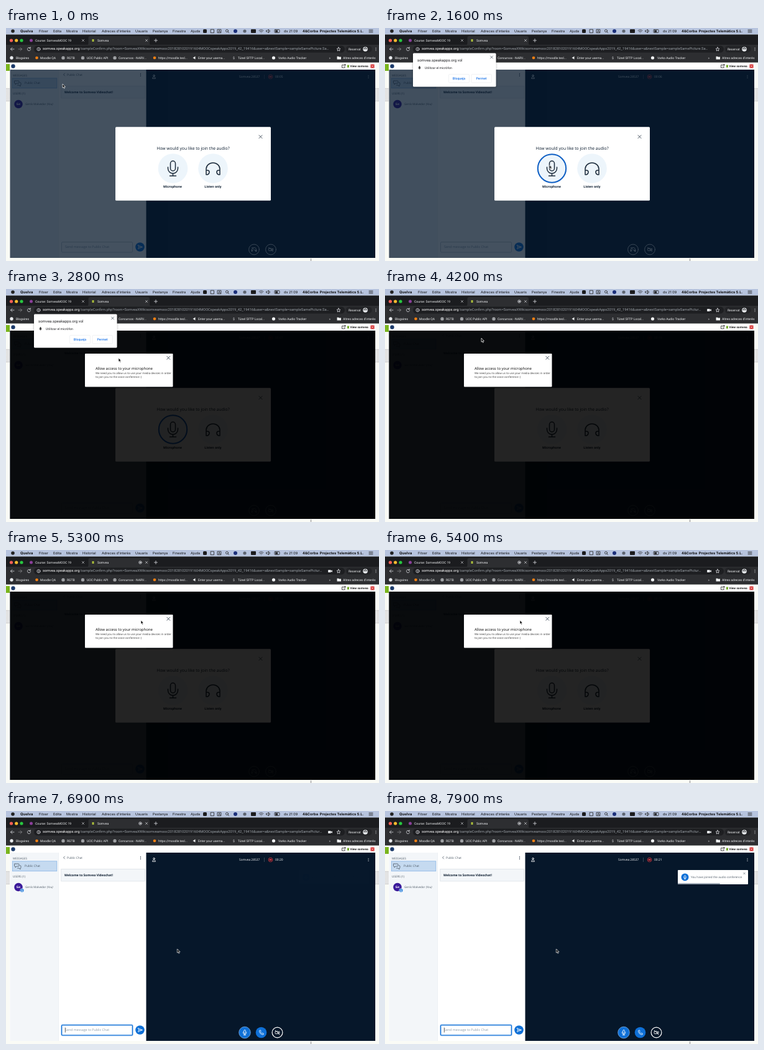
Recreate the animation shown at these times as an HTML page. Size 600 by 375 pixels, loop 8000 ms.

```html
<!DOCTYPE html>
<html lang="ca">
<head>
<meta charset="utf-8">
<title>Audio check</title>
<style>
html, body { margin: 0; width: 100%; height: 100%; overflow: hidden; background: #fff; }
svg { position: absolute; left: 0; top: 0; width: 600px; height: 375px; }
text { white-space: pre; text-rendering: geometricPrecision; }
.sys { font: 5.6px Inter, sans-serif; fill: #111; }
.ui { font: 5.05px Roboto, sans-serif; fill: #f1f3f4; }
.app { font: 4.8px "Open Sans", sans-serif; fill: #4e5a66; }
.b { font-weight: 700; }
.mid { text-anchor: middle; }
.ink { fill: #06172a; }
.line { fill: none; stroke: #4e5a66; stroke-width: .8; stroke-linecap: round; stroke-linejoin: round; }
.white { stroke: #fff; }
.light { stroke: #dcdee2; }
.navy { stroke: #1b2a3a; stroke-width: 1.5; }
.head { font-size: 6.75px; }
.url {
  position: absolute; left: 59px; top: 29px; width: 465px; height: 10px;
  font: 5.75px/10px Roboto, sans-serif; color: #9aa0a6; white-space: nowrap;
  overflow: hidden; text-overflow: ellipsis; text-rendering: geometricPrecision;
  animation: url 8s step-end infinite;
}
.url b { font-weight: 400; color: #fff; }

/* 1% = 80 ms */
.cut { animation: 8s step-end infinite; }
@keyframes url { 0% { width: 465px } 47.5% { width: 452px } }
@keyframes capture { 0% { opacity: 0 } 47.5% { opacity: 1 } }
@keyframes prompt { 0% { opacity: 0 } 16.25% { opacity: 1 } 47.5% { opacity: 0 } }
@keyframes ring { 0% { opacity: 0 } 14.375% { opacity: 1 } 47.5% { opacity: 0 } }
@keyframes ask { 0% { opacity: 1 } 68.75% { opacity: 0 } }
@keyframes echo { 0% { opacity: 0 } 68.75% { opacity: 1 } 82.5% { opacity: 0 } }
@keyframes before { 0% { opacity: 1 } 82.5% { opacity: 0 } }
@keyframes after { 0% { opacity: 0 } 82.5% { opacity: 1 } }
@keyframes caret { 0% { opacity: 0 } 83.75% { opacity: 1 } 90% { opacity: 0 } 96.25% { opacity: 1 } }
@keyframes t05 { 0% { opacity: 1 } 7.5% { opacity: 0 } }
@keyframes t06 { 0% { opacity: 0 } 7.5% { opacity: 1 } 20.625% { opacity: 0 } }
@keyframes t07 { 0% { opacity: 0 } 20.625% { opacity: 1 } 47.5% { opacity: 0 } }
@keyframes t19 { 0% { opacity: 0 } 47.5% { opacity: 1 } 82.5% { opacity: 0 } }
@keyframes t20 { 0% { opacity: 0 } 82.5% { opacity: 1 } 94.375% { opacity: 0 } }
@keyframes t21 { 0% { opacity: 0 } 94.375% { opacity: 1 } }
.allow { animation: allow 8s linear infinite; }
@keyframes allow { 0%, 20% { opacity: 0 } 26.25%, 68.125% { opacity: 1 } 68.75%, 100% { opacity: 0 } }
.toast { animation: toast 8s ease-out infinite; }
@keyframes toast { 0%, 86.25% { opacity: 0 } 88.75%, 100% { opacity: 1 } }
.bar { transform-origin: 471px 0; animation: bar 8s linear infinite; }
@keyframes bar { 0%, 86.25% { transform: none } 100% { transform: scaleX(.56) } }
.cursor { animation: move 8s ease-in-out infinite; }
@keyframes move {
  0%, 1.25% { transform: translate(91px, 90px) }
  12.5%, 28.75% { transform: translate(264.5px, 220.5px) }
  35% { transform: translate(181px, 111px) }
  39.375%, 58.75% { transform: translate(155px, 79px) }
  66.25%, 67.5% { transform: translate(217px, 113px) }
  75%, 100% { transform: translate(275.5px, 222px) }
}
</style>
</head>
<body>
<svg viewBox="0 0 600 375">
  <defs>
    <pattern id="hatch" width="2" height="2" patternUnits="userSpaceOnUse">
      <rect width="2" height="2" fill="#eee"/><path d="M0 2L2 0" stroke="#c4c4c4" stroke-width=".5"/>
    </pattern>
    <filter id="shade" x="-10%" y="-10%" width="120%" height="130%">
      <feDropShadow dx="0" dy="1" stdDeviation="1.5" flood-opacity=".4"/>
    </filter>
    <path id="x" d="M-2-2L2 2M2-2L-2 2"/>
    <path id="slash" d="M-3.5-3.5L3.5 3.5"/>
    <g id="globe"><circle r="2.6" fill="#dfe1e5"/><path d="M-2.6 0H2.6M0-2.6C-1.8-1-1.8 1 0 2.6C1.8 1 1.8-1 0-2.6" fill="none" stroke="#2d2e31" stroke-width=".5"/></g>
    <g id="dots"><circle cy="-2" r=".6"/><circle r=".6"/><circle cy="2" r=".6"/></g>
    <g id="mic"><rect x="-4" y="-12" width="8" height="16" rx="4"/><path d="M-8-2V0A8 8 0 0 0 8 0V-2M0 8V12M-5 12H5"/></g>
    <path id="phones" d="M-11 8V0A11 10 0 0 1 11 0V8M-11 2H-9Q-6 2-6 5T-9 9H-11ZM11 2H9Q6 2 6 5T9 9H11Z"/>
    <path id="thumb" d="M-8 0H-3Q1-3 0-8Q0-10 2-10Q5-9 4-2H7Q9-1 8 1Q9 3 7 4Q8 6 6 7Q6 9 4 9H-2Q-4 8-8 8Z"/>
    <g id="person"><circle cy="-1.3" r="1.3"/><path d="M-2.4 3Q-2.4.7 0 .7T2.4 3Z"/></g>
    <g id="cam"><rect x="-3.4" y="-2" width="4.6" height="4" rx=".6"/><path d="M1.2-.4L3.4-1.7V1.7L1.2.4"/></g>
  </defs>

  <!-- page behind the dialog -->
  <rect width="600" height="375" fill="#fafbf6"/>
  <path d="M0 97H600V118H0Z" fill="url(#hatch)"/>
  <path d="M0 97.3H600M0 117.7H600" stroke="#bbb" stroke-width=".5"/>
  <rect y="58" width="7" height="11" fill="#7ab51d"/>
  <rect x="489.5" y="371" width="2" height="4" fill="#bbb"/>
  <rect x="6" y="56" width="588" height="314" fill="#fff"/>
  <circle cx="11.5" cy="61.5" r="3.2" fill="#1b3a6b"/>
  <path class="line" d="M543 59.5H540.5V64H545V62M543 61.5L546 58.7M544 58.7H546V60.5" style="stroke:#222"/>
  <rect x="549" y="59.5" width="2.8" height="4" fill="#6aa51c"/>
  <text class="app b" x="553.5" y="63.2" style="font-size:4.5px;fill:#111">View somvea</text>
  <rect x="586.5" y="58.5" width="6" height="6" fill="#d62c2c"/>
  <use href="#x" class="line white" transform="translate(589.5 61.5) scale(.8)"/>

  <!-- system menu -->
  <rect width="600" height="10.5" fill="#b7c4de"/>
  <circle cx="11" cy="5" r="2.8" fill="#222"/>
  <g class="sys">
    <text class="b" x="23" y="7" style="font-size:5.9px">Quelva</text>
    <text x="53" y="7">Fitxer</text><text x="76" y="7">Edita</text><text x="97" y="7">Mostra</text>
    <text x="123" y="7">Historial</text><text x="154" y="7">Adreces d'interès</text><text x="208" y="7">Usuaris</text>
    <text x="236" y="7">Pestanya</text><text x="268" y="7">Finestra</text><text x="297" y="7">Ajuda</text>
    <text x="447" y="7">ds 21:09</text>
    <text class="b" x="477" y="7" style="font-size:5.75px">4&amp;Corba  Projectes Telemàtics S.L.</text>
  </g>
  <g fill="#1c1c1e">
    <rect x="317" y="2" width="6" height="6" rx="1.5"/><rect x="394" y="2" width="8" height="6" rx="1"/>
    <rect x="433.2" y="3.6" width="4" height="3"/>
  </g>
  <circle cx="369" cy="5" r="3" fill="#1b2f7a"/><circle cx="384" cy="5" r="2.6" fill="#5d6470"/>
  <g class="line" style="stroke:#222">
    <rect x="329.5" y="2.3" width="5" height="5.4"/><rect x="340.5" y="2.3" width="5.4" height="5.4"/><path d="M342 6.5L343.2 3.5L344.5 6.5"/>
    <circle cx="355.5" cy="4.5" r="2"/><path d="M357 6L358.5 7.6M407 4.2Q410.5 1.3 414 4.2M408.4 5.8Q410.5 4 412.6 5.8M410.5 7.3V7.4"/>
    <path d="M419 4H420.5L422.5 2V8L420.5 6H419ZM424 3.5Q425.2 5 424 6.5M584 3H590M584 5H590M584 7H590"/>
    <rect x="432" y="2.5" width="8" height="5" rx="1"/>
  </g>

  <!-- browser frame -->
  <rect y="10.5" width="600" height="17" fill="#1b1c1f"/>
  <rect y="27" width="600" height="28.5" fill="#2d2e31"/>
  <path d="M130 27.5Q132.5 27.5 132.5 24V16Q132.5 13 135.5 13H228Q231 13 231 16V24Q231 27.5 233.5 27.5Z" fill="#2d2e31"/>
  <circle cx="8.5" cy="20" r="2.6" fill="#ff5f57"/><circle cx="16.7" cy="20" r="2.6" fill="#febc2e"/><circle cx="25" cy="20" r="2.6" fill="#28c840"/>
  <circle cx="40.5" cy="20" r="2.5" fill="#8c3f9c"/><rect x="138.5" y="18" width="3" height="4" fill="#a9bd3a"/>
  <g class="ui">
    <text x="47" y="21.8">Course: SomveaMOOC 19</text><text x="147" y="21.8">Somvea</text>
  </g>
  <rect x="45" y="28.5" width="500" height="11" rx="5.5" fill="#1d1e21"/>
  <rect x="546.5" y="28.5" width="42" height="11" rx="5.5" fill="#232427"/>
  <g class="line light">
    <use href="#x" transform="translate(124 20) scale(.8)"/><use href="#x" transform="translate(226 20) scale(.8)"/>
    <path d="M238.5 20H243.5M241 17.5V22.5M13 34H7.5M10 31.5L7.5 34L10 36.5"/>
    <path d="M20 34H25.5M23 31.5L25.5 34L23 36.5" opacity=".5"/>
    <path d="M39 32.3A2.6 2.6 0 1 0 39.6 34.5M39.3 30.8V32.7H37.4"/>
    <circle cx="52.5" cy="34" r="2.6"/><path d="M52.5 33.8V35.3M52.5 32.6V32.7"/>
    <path d="M535 31L535.9 33.1L538 33.3L536.4 34.8L536.9 37L535 35.8L533.1 37L533.6 34.8L532 33.3L534.1 33.1Z"/>
  </g>
  <text class="ui" x="551" y="36">Reservat</text>
  <circle cx="578" cy="34" r="3.8" fill="#e8eaed"/>
  <path d="M575 33.6H581M576.5 32.8L577 31.4H579L579.5 32.8" stroke="#202124" stroke-width=".8" fill="none"/>
  <use href="#dots" fill="#e8eaed" x="595" y="34"/>
  <g class="cut" style="animation-name:capture">
    <circle class="line light" cx="216" cy="20" r="2.3"/><circle cx="216" cy="20" r="1.1" fill="#e8eaed"/>
    <use href="#cam" x="521.5" y="34" fill="#e8eaed"/>
  </g>

  <!-- bookmarks -->
  <g class="ui">
    <circle cx="9" cy="48" r="2.7" fill="#e8eaed"/>
    <circle cx="49.5" cy="48" r="2.3" fill="#f98012"/><circle cx="239" cy="48" r="2.3" fill="#f98012"/>
    <use href="#globe" x="92" y="48"/><use href="#globe" x="123.5" y="48"/><use href="#globe" x="175" y="48"/>
    <path d="M304.5 45.5L300.5 48L304.5 50.5Z"/><text x="365" y="50">$</text>
    <circle cx="430.5" cy="48" r="2.6"/>
    <path d="M532.5 45.8H535L535.7 46.6H539V50.5H532.5Z"/>
    <text x="16" y="49.8">Blogaires</text><text x="55" y="49.8">Moodle QA</text><text x="98" y="49.8">RGTB</text>
    <text x="130" y="49.8">UOC Public API</text><text x="181" y="49.8">Concursos - NARV...</text>
    <text x="245" y="49.8">https://moodle.tesl...</text><text x="309" y="49.8">Enter your userna...</text>
    <text x="373" y="49.8">Túnel SFTP Local...</text><text x="438" y="49.8">Varko Audio Tracker</text>
    <text x="519.5" y="49.8">»</text><text x="542" y="49.8">Altres adreces d'interès</text>
  </g>

  <!-- conference -->
  <g class="app">
    <rect x="6.5" y="67" width="78" height="303" fill="#f3f6f9"/>
    <text x="11" y="77.5" style="font-size:4.6px">MESSAGES</text>
    <rect x="10.3" y="80.8" width="71.5" height="16" fill="#c5daf0" stroke="#7fb0e4" stroke-width=".7"/>
    <path class="line" d="M14 85H20Q21 85 21 86V88Q21 89 20 89H17L15 91V89H14.5Q13.5 89 13.5 88V86Q13.5 85 14 85M22.5 87.5Q24 87.5 24 89V91Q24 92 23 92V94L21 92H18.5"/>
    <text x="30" y="90.4">Public Chat</text>
    <text x="11" y="107" style="font-size:4.6px">USERS (1)</text>
    <circle cx="20" cy="122.5" r="6.8" fill="#3b1a9a"/>
    <text class="mid b" x="20" y="124.2" style="fill:#fff">Ge</text>
    <text x="31" y="124.2" style="font-size:4.6px">Genís Malvedor <tspan font-style="italic">(You)</tspan></text>
    <rect x="84.5" y="67" width="141" height="303" fill="#fff"/>
    <path d="M84.5 67V370" stroke="#dfe4ea" stroke-width=".5"/>
    <path class="line" d="M94.5 73L92.5 75L94.5 77"/>
    <text x="98" y="76.9">Public Chat</text>
    <use href="#dots" x="216.5" y="75.3" class="ink"/>
    <rect x="88.8" y="93.5" width="134.5" height="19.5" fill="#f3f6f9" stroke="#d3d9e0" stroke-width=".6"/>
    <text class="b ink" x="94" y="104.9" style="font-size:5px">Welcome to Somvea Videochat!</text>
    <rect x="89.5" y="344.5" width="114" height="16.5" rx="1.5" fill="#fff" stroke="#b4bec9" stroke-width=".8"/>
    <g class="cut" style="animation-name:after">
      <rect x="89.5" y="344.5" width="114" height="16.5" rx="1.5" fill="none" stroke="#a9cbf1" stroke-width="2.4"/>
      <rect x="89.5" y="344.5" width="114" height="16.5" rx="1.5" fill="none" stroke="#0f70d7" stroke-width="1.2"/>
      <circle cx="25.8" cy="127.8" r="3" fill="#0f70d7" stroke="#f3f6f9" stroke-width=".6"/>
      <use href="#mic" class="line white" transform="translate(25.8 127.8) scale(.14)" style="stroke-width:3"/>
    </g>
    <text x="95" y="354.3" style="font-size:5.3px;fill:#8b9aa8">Send message to Public Chat</text>
    <path class="cut" d="M95.3 348.5V356.5" stroke="#222" stroke-width=".7" style="animation-name:caret"/>
    <circle cx="215.5" cy="352.5" r="7.3" fill="#0f70d7"/>
    <path class="line white" d="M212.5 349.5L219.5 352.5L212.5 355.5L213.7 352.5ZM213.7 352.5H219"/>

    <rect x="225.5" y="67" width="368.5" height="303" fill="#06172a"/>
    <use href="#person" class="line white" x="238" y="78"/>
    <text x="375" y="80.2" style="font-size:4.9px;fill:#fff">Somvea 28537</text>
    <path d="M415.5 75V82" stroke="#5a6672" stroke-width=".6"/>
    <circle cx="425.5" cy="78.5" r="3.3" fill="none" stroke="#e0353b" stroke-width=".8"/><rect x="423.5" y="77.3" width="4" height="2.4" rx=".6" fill="#e0353b"/>
    <g style="font-size:4.95px;fill:#fff">
      <text class="cut" x="433" y="80.2" style="animation-name:t05">00:05</text>
      <text class="cut" x="433" y="80.2" style="animation-name:t06">00:06</text>
      <text class="cut" x="433" y="80.2" style="animation-name:t07">00:07</text>
      <text class="cut" x="433" y="80.2" style="animation-name:t19">00:19</text>
      <text class="cut" x="433" y="80.2" style="animation-name:t20">00:20</text>
      <text class="cut" x="433" y="80.2" style="animation-name:t21">00:21</text>
    </g>
    <use href="#dots" x="583" y="78.5" fill="#fff"/>
    <g class="cut line white" style="animation-name:before">
      <circle cx="399" cy="356.5" r="8.4"/><circle cx="426" cy="356.5" r="8.4"/>
      <use href="#phones" transform="translate(399 356.5) scale(.32)" style="stroke-width:2.4"/>
      <use href="#slash" x="399" y="356.5"/><use href="#cam" x="426" y="356.5"/><use href="#slash" x="426" y="356.5"/>
    </g>
    <g class="cut" style="animation-name:after">
      <circle cx="384" cy="356.5" r="9.3" fill="#0f70d7" stroke="#7fb0e4" stroke-width=".8"/><circle cx="410.5" cy="356.5" r="8.8" fill="#0f70d7"/>
      <circle cx="436.5" cy="356.5" r="8.4" class="line white" style="stroke-width:1.2"/>
      <g class="line white">
        <use href="#mic" transform="translate(384 356.5) scale(.34)" style="stroke-width:2.4"/>
        <path d="M407.5 354Q408 360 414 360L414.2 358L412.3 357.3L411.4 358Q409.8 357 409.4 355.6L410.2 354.7L409.4 353Z"/>
        <use href="#cam" x="436.5" y="356.5"/><use href="#slash" x="436.5" y="356.5"/>
      </g>
    </g>
  </g>

  <!-- modals -->
  <rect class="cut" x="6.5" y="67" width="587.5" height="303" fill="#06172a" fill-opacity=".75" style="animation-name:before"/>
  <g class="cut app" style="animation-name:ask">
    <rect x="176" y="159.3" width="250" height="118.5" rx="1.5" fill="#fff"/>
    <use href="#x" class="line" transform="translate(409.5 175) scale(1.25)"/>
    <text class="mid head ink" x="301" y="195.7">How would you like to join the audio?</text>
    <circle cx="268.5" cy="226" r="23.8" fill="#edf5fb"/><circle cx="333" cy="226" r="23.8" fill="#edf5fb"/>
    <circle class="cut" cx="268.5" cy="226" r="22.7" fill="none" stroke="#0f5fc4" stroke-width="2" style="animation-name:ring"/>
    <use href="#mic" class="line navy" x="268.5" y="226"/><use href="#phones" class="line navy" x="333" y="227"/>
    <g class="mid b ink" style="font-size:5px">
      <text x="268" y="257.3">Microphone</text><text x="333" y="257.3">Listen only</text>
    </g>
  </g>
  <g class="cut app" style="animation-name:echo">
    <rect x="176" y="160.5" width="250" height="116.5" rx="1.5" fill="#fff"/>
    <use href="#x" class="line" transform="translate(409.5 176) scale(1.25)"/>
    <text class="mid head ink" x="301" y="197">This is a private echo test. Speak a few words. Did you hear audio?</text>
    <circle cx="271" cy="224.5" r="21" fill="#0a8072"/><circle cx="330.5" cy="224.5" r="21" fill="#ca0a1a"/>
    <g class="line white" style="stroke-width:1.3">
      <use href="#thumb" x="271" y="225.5"/><use href="#thumb" transform="translate(330.5 224) scale(1 -1)"/>
    </g>
    <g class="mid b ink" style="font-size:5px">
      <text x="270.8" y="253.3">Yes</text><text x="330.3" y="253.3">No</text>
    </g>
  </g>
  <g class="allow app">
    <rect x="6.5" y="67" width="587.5" height="303" fill="#000" fill-opacity=".86"/>
    <rect x="127" y="104" width="141.5" height="53.5" rx="1" fill="#fff"/>
    <use href="#x" class="line" transform="translate(261.3 110.8) scale(1.25)"/>
    <text x="144" y="129.7" style="font-size:6px;fill:#000">Allow access to your microphone</text>
    <g style="font-size:4.43px;fill:#333">
      <text x="144" y="136.8">We need you to allow us to use your media devices in order</text>
      <text x="144" y="142.7">to join you to the voice conference :)</text>
    </g>
  </g>

  <g class="toast app">
    <rect x="471" y="95" width="113" height="23" rx="1" fill="#fff"/>
    <circle cx="482.5" cy="106.5" r="6" fill="#0f70d7"/>
    <use href="#mic" class="line white" transform="translate(482.5 106.5) scale(.25)" style="stroke-width:2.6"/>
    <text x="492" y="108.2" style="font-size:4.7px">You have joined the audio conference</text>
    <use href="#x" class="line" transform="translate(578 100.5) scale(.7)"/>
    <rect class="bar" x="471" y="116" width="113" height="2" fill="#a3adb8"/>
  </g>

  <!-- permission prompt -->
  <g class="cut ui" style="animation-name:prompt;fill:#202124">
    <rect x="45" y="40.5" width="133.5" height="54" rx="1.5" fill="#fff" filter="url(#shade)"/>
    <text x="52" y="53.5" style="font-size:6.1px">somvea.speakapps.org vol</text>
    <use href="#x" class="line" x="171.5" y="47"/>
    <use href="#mic" transform="translate(55.5 64) scale(.22)" fill="#333" stroke="#333" stroke-width="1"/>
    <text x="64" y="65.8">Utilitzar el micròfon</text>
    <g fill="#fff" stroke="#e8eaed" stroke-width=".6">
      <rect x="102.5" y="74.5" width="33" height="13.5" rx="1.5"/><rect x="139" y="74.5" width="32.5" height="13.5" rx="1.5"/>
    </g>
    <g class="mid" style="font-size:5.2px;font-weight:500;fill:#1a73e8">
      <text x="119" y="83.1">Bloqueja</text><text x="155" y="83.1">Permet</text>
    </g>
  </g>

  <path class="cursor" d="M0 0V6.2L1.4 5L2.4 7.3L3.5 6.8L2.5 4.6H4.4Z" stroke="#fff" stroke-width=".7"/>
</svg>
<div class="url"><b>somvea.speakapps.org</b>/sampleConfirm.php?room=SomveaXWikisomveamooc2018281020191604MOOCspeakApps2019_42_19416&amp;user=a&amp;nextSample=sampleSamePicture.SampleSamePicture</div>
</body>
</html>
```
